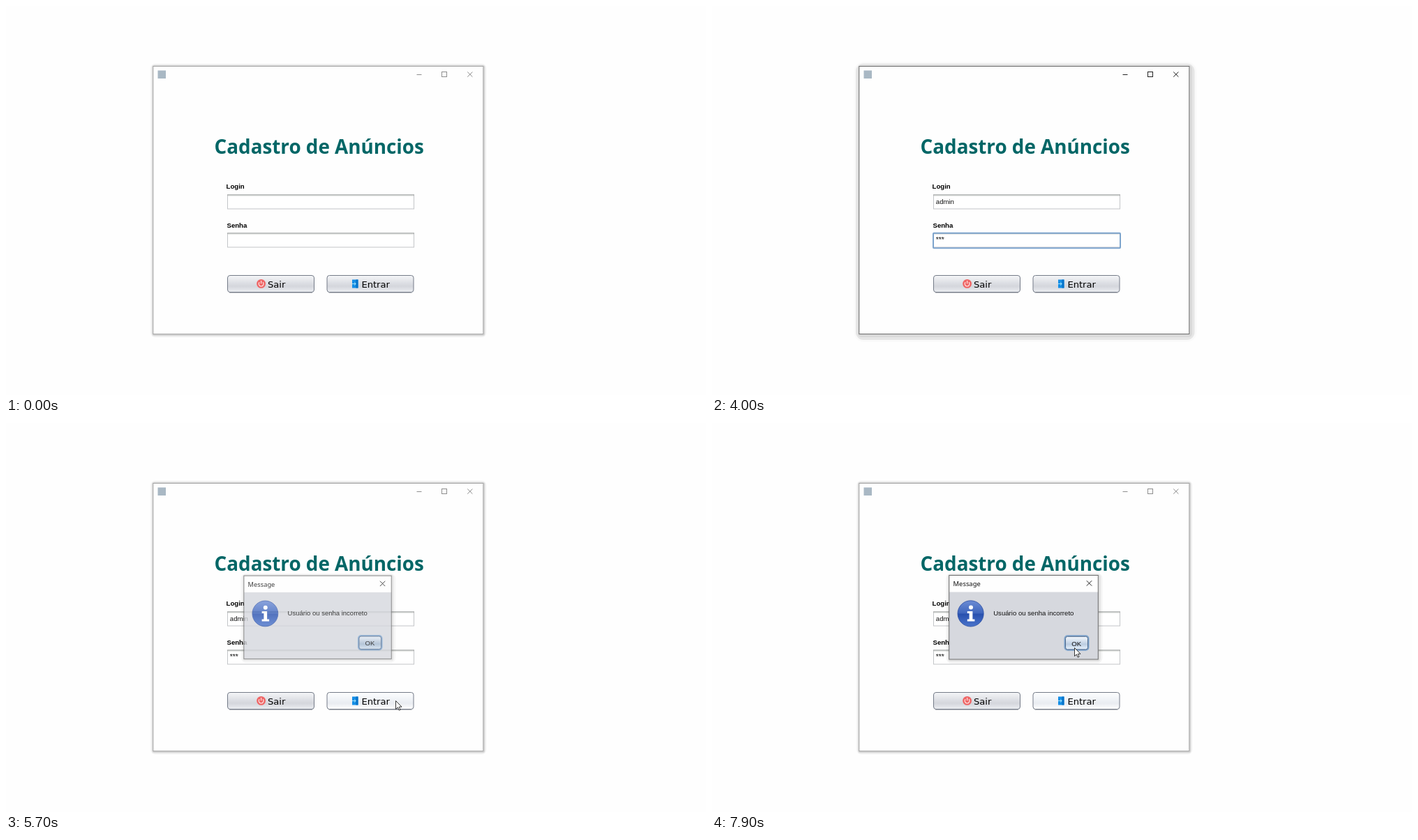
An HTML page for the animation above (8 s loop, 1003 by 558 pixels).

```html
<!DOCTYPE html>
<html lang="pt-BR">
<head>
<meta charset="utf-8">
<title>Login</title>
<style>
  html, body { margin: 0; width: 100%; height: 100%; overflow: hidden; background: #fefefe; }
  svg { display: block; width: 1003px; height: 558px; }
  text { font: 9.6px "Liberation Sans", Arial, sans-serif; fill: #111; }
  .label { font-weight: bold; fill: #000; }
  .title { font: bold 27.8px "Noto Sans", "Open Sans", sans-serif; fill: #066; }
  .caption { font: 9.4px "Noto Sans", "Open Sans", sans-serif; }
  .action { font: 13.1px "DejaVu Sans", sans-serif; fill: #000; }
  .stars { font-size: 10.3px; }
  .line { fill: none; stroke: #222; }
  .ring { fill: none; stroke: #7da4cd; stroke-width: 2; }
  .frame { fill: none; stroke: #6c6c6c; }
  .inactive .frame { stroke: #a6a6a6; }
  .inactive .controls .line { stroke: #8e8e8e; }
  .idleShadow, .inactive .activeShadow { display: none; }
  .inactive .idleShadow { display: inline; }
  /* Custom properties inherit into <use> copies, so each button can set its own face. */
  .face { fill: var(--face, url(#normal)); stroke: var(--edge, #747b88); }
  .hover { --face: url(#hover); }
  .pressed { --face: url(#pressed); --edge: #34465f; }
</style>
</head>
<body>
<svg viewBox="0 0 1003 558">
  <defs>
    <linearGradient id="normal" x2="0" y2="1">
      <stop stop-color="#f5f6f8"/><stop offset=".45" stop-color="#dddfe4"/>
      <stop offset=".65" stop-color="#d4d6dc"/><stop offset="1" stop-color="#eceef2"/>
    </linearGradient>
    <linearGradient id="hover" x2="0" y2="1">
      <stop stop-color="#fdfeff"/><stop offset=".45" stop-color="#eff2f6"/>
      <stop offset=".65" stop-color="#e9ecf1"/><stop offset="1" stop-color="#fff"/>
    </linearGradient>
    <linearGradient id="pressed" x2="0" y2="1">
      <stop stop-color="#8f96a5"/><stop offset=".2" stop-color="#abb0bc"/>
      <stop offset=".6" stop-color="#a2a8b5"/><stop offset="1" stop-color="#c5cad4"/>
    </linearGradient>
    <linearGradient id="okFace" x2="0" y2="1">
      <stop stop-color="#e6edf5"/><stop offset=".45" stop-color="#b4c5d8"/>
      <stop offset=".6" stop-color="#a3b8cf"/><stop offset="1" stop-color="#d3e2f0"/>
    </linearGradient>
    <linearGradient id="okHover" x2="0" y2="1">
      <stop stop-color="#f4f8fd"/><stop offset=".45" stop-color="#cbd9e9"/>
      <stop offset=".6" stop-color="#bccde1"/><stop offset="1" stop-color="#e9f4ff"/>
    </linearGradient>
    <linearGradient id="info" x2="0" y2="1">
      <stop stop-color="#6c8cd4"/><stop offset=".48" stop-color="#3f66bd"/>
      <stop offset=".52" stop-color="#2850ae"/><stop offset="1" stop-color="#4a74cb"/>
    </linearGradient>
    <g id="field">
      <rect x=".5" y=".5" width="267" height="20" fill="#fff" stroke="#c3c5c8"/>
      <path d="M0 .5h268" stroke="#959896"/>
      <path d="M1 1.5h266" stroke="#d3d6d2"/>
    </g>
    <g id="button">
      <path d="M3 25.2h119" stroke="#777b83" stroke-opacity=".7"/>
      <rect class="face" x=".5" y=".5" width="124" height="24" rx="3.5"/>
    </g>
  </defs>

  <g id="window">
    <g class="activeShadow">
      <rect x="203.5" y="80" width="491" height="402" rx="14" opacity=".015"/>
      <rect x="206" y="82.5" width="485.5" height="396.5" rx="11" opacity=".08"/>
      <rect x="209" y="85" width="479" height="390" rx="5" opacity=".06"/>
    </g>
    <g class="idleShadow">
      <rect x="207.5" y="83" width="480.5" height="392" rx="6" opacity=".06"/>
      <rect x="209.5" y="85" width="476.5" height="388" rx="3" opacity=".12"/>
    </g>
    <rect x="211" y="86.5" width="473" height="384" fill="#fefefe"/>
    <rect class="frame" x="210.8" y="86.5" width="473" height="384"/>
    <rect x="217.5" y="92.5" width="11.5" height="11.5" fill="#a9b8c4"/>
    <g class="controls">
      <path class="line" d="M588.5 98.5h7M661.2 94.5l7.2 7.2M668.4 94.5l-7.2 7.2"/>
      <rect class="line" x="624.5" y="94.5" width="7" height="7"/>
    </g>
    <text class="title" x="298.6" y="212">Cadastro de Anúncios</text>

    <text class="label" x="315.6" y="261.5">Login</text>
    <use href="#field" x="317" y="270.5"/>
    <rect id="loginRing" class="ring" x="317" y="270.3" width="268" height="21.5" rx="1"/>
    <text id="login" x="320.8" y="284"></text>

    <text class="label" x="316.5" y="318">Senha</text>
    <use href="#field" x="317" y="325.5"/>
    <rect id="senhaRing" class="ring" x="317" y="325.8" width="268" height="21.5" rx="1"/>
    <text id="senha" class="stars" x="320.8" y="339"></text>
    <path id="caret" class="line" d="M.5 0v12.5"/>

    <use href="#button" x="317" y="386"/>
    <circle cx="365.6" cy="398.4" r="6.4" fill="#ef6565"/>
    <path d="M363.2 396.2a3.4 3.4 0 1 0 4.8 0M365.6 394v4.2" fill="none" stroke="#fde3e1" stroke-width="1.2"/>
    <text class="action" x="375" y="404">Sair</text>

    <g id="enter">
      <rect id="enterRing" class="ring" x="459.7" y="386" width="125" height="25.5" rx="4"/>
      <use href="#button" x="459.5" y="386"/>
      <path d="M496 392.5h8.5v12h-8.5z" fill="#148ee6"/>
      <path d="M501.5 392.5h3v12h-3z" fill="#0873c8"/>
      <path d="M496 398.5h5M499 396.5l2.3 2-2.3 2" fill="none" stroke="#9fe2fa"/>
      <text class="action" x="509.4" y="404">Entrar</text>
    </g>
  </g>

  <g id="dialog">
    <rect x="335.5" y="215" width="224" height="130" rx="8" opacity=".045"/>
    <rect x="338" y="217" width="218.5" height="125" rx="4" opacity=".08"/>
    <rect x="340" y="218.5" width="213.5" height="120.5" fill="#d6d8de"/>
    <rect x="340" y="218.5" width="213.5" height="24" fill="#fefefe"/>
    <rect class="frame" x="339.8" y="218.5" width="213.5" height="120.5"/>
    <text class="caption" x="345.6" y="234.2">Message</text>
    <path class="line" d="M536.8 226.2l7.4 7.4M544.2 226.2l-7.4 7.4"/>
    <circle cx="370.6" cy="273.4" r="18.6" fill="url(#info)" stroke="#2c4fa3" stroke-width=".8"/>
    <circle cx="371" cy="264.6" r="3" fill="#fff"/>
    <path d="M365.8 270h7.6v11.5h3v3h-10.6v-3h2.8v-8.5h-2.8z" fill="#fff"/>
    <text x="403.2" y="276.2">Usuário ou senha incorreto</text>
    <rect class="ring" x="505.5" y="305.3" width="34" height="20.5" rx="4"/>
    <rect id="ok" x="506.5" y="306.3" width="32" height="18.5" rx="3" stroke="#50698a"/>
    <text x="515.2" y="319.6">OK</text>
  </g>

  <path id="cursor" d="M.5 .5v12l2.8-2.6 1.9 4.2 1.8-.8-1.8-4.1h3.8z" fill="#fff" stroke="#222" stroke-width=".9"/>
</svg>
<script>
  const LOOP = 8000, STEP = 100;
  const $ = id => document.getElementById(id);
  const within = (t, spans) => spans.some(([from, to]) => t >= from && t < to);
  const show = (id, on) => { $(id).style.display = on ? 'inline' : 'none'; };

  // Pointer trips as [time, x, y]; it is invisible between trips, over the text fields.
  const trips = [
    [[100, 26, 0], [300, 120, 75], [500, 310, 195], [700, 440, 258], [799, 450, 268]],
    [[4300, 586, 283], [4400, 603, 285], [4500, 609, 300], [4700, 588, 360], [4900, 558, 398],
     [5700, 558, 398], [5900, 465, 400], [6100, 380, 389], [6200, 380, 389], [6300, 418.5, 285],
     [6700, 456, 279], [7000, 497, 273], [7100, 506, 275], [7200, 506, 275], [7300, 523, 275],
     [7600, 523, 275], [7700, 523, 287], [7800, 521, 308], [7900, 519, 321.5], [LOOP, 519, 321.5]]
  ];
  const carets = [[900, 1300], [1800, 2800], [3100, 4000], [4500, 4900]];
  const starTimes = [3100, 3300, 3500];

  function pointerAt(t) {
    const trip = trips.find(p => t >= p[0][0] && t <= p[p.length - 1][0]);
    if (!trip) return null;
    const i = Math.max(1, trip.findIndex(p => p[0] >= t));
    const [t0, x0, y0] = trip[i - 1], [t1, x1, y1] = trip[i];
    const k = (t - t0) / (t1 - t0);
    return [x0 + (x1 - x0) * k, y0 + (y1 - y0) * k];
  }

  function drawDialog(t) {
    show('dialog', t >= 5600);
    const [opacity, scale] = t < 5700 ? [.3, .965] : t < 5800 ? [.8, .99] : [1, 1];
    $('dialog').setAttribute('opacity', opacity);
    $('dialog').setAttribute('transform',
      `translate(446.5 278.5) scale(${scale}) translate(-446.5 -278.5)`);
    $('ok').setAttribute('fill', `url(#${t >= 7800 ? 'okHover' : 'okFace'})`);
  }

  function drawFields(t) {
    const typed = Math.max(0, Math.min(5, Math.floor((t - 1700) / 100)));
    $('login').textContent = 'admin'.slice(0, typed);
    $('senha').textContent = '*'.repeat(starTimes.filter(s => t >= s).length);
    show('loginRing', within(t, [[800, 2400]]));
    show('senhaRing', within(t, [[2400, 5100]]));
    show('caret', within(t, carets));
    const first = t < 2400, text = $(first ? 'login' : 'senha');
    const x = 321 + Math.round(text.textContent ? text.getComputedTextLength() : 0);
    $('caret').setAttribute('transform', `translate(${x} ${first ? 274 : 329.3})`);
  }

  function draw(t) {
    $('window').setAttribute('class', within(t, [[800, 5600]]) ? '' : 'inactive');
    const pressed = within(t, [[5100, 5600]]);
    $('enter').setAttribute('class', pressed ? 'pressed' : t >= 4800 ? 'hover' : '');
    show('enterRing', pressed);
    drawFields(t);
    drawDialog(t);
    const point = pointerAt(t);
    show('cursor', point);
    if (point) $('cursor').setAttribute('transform', `translate(${point.map(Math.round)})`);
  }

  function tick() {
    draw(Math.floor(performance.now() % LOOP / STEP) * STEP);
    requestAnimationFrame(tick);
  }
  tick();
</script>
</body>
</html>
```
